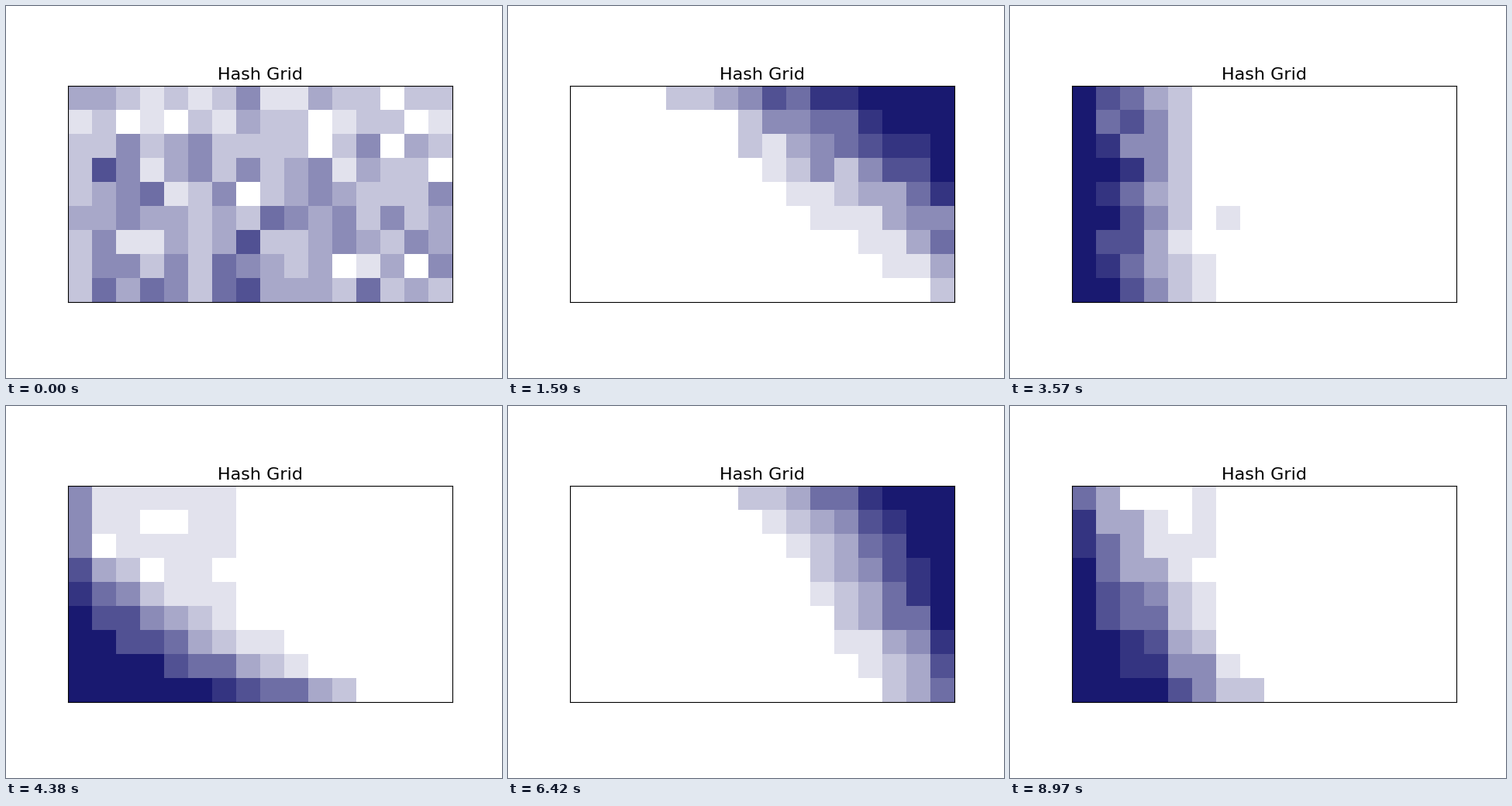
A matplotlib script that plays this animation: 640x480 px, repeating every 9 s.

```python
import numpy as np
import matplotlib.pyplot as plt
from matplotlib.animation import FuncAnimation
from matplotlib.colors import LinearSegmentedColormap

COLS, ROWS = 16, 9
FRAMES, INTERVAL = 300, 30
FULL = 8      # particles in a cell that give the darkest shade
HOLD = 6      # frames between two noise layers
TURN = 2.1    # mean rotation of the swarm, degrees per frame

x, y = np.meshgrid(np.arange(COLS), np.arange(ROWS))
rng = np.random.default_rng(7)
layers = rng.normal(size=(FRAMES // HOLD + 2, ROWS, COLS))


def fill(ramp, total):
    """Raise the ramp until its positive part holds the given total."""
    lo, hi = -30.0, 30.0
    for _ in range(30):
        mid = (lo + hi) / 2
        if np.clip(ramp + mid, 0, None).sum() < total:
            lo = mid
        else:
            hi = mid
    return ramp + lo


def heading(frame):
    """Steady turn that slows down along the long walls."""
    wobble = 27 * np.cos(np.radians(2 * TURN * (frame - 89)))
    return np.radians(TURN * frame - 84 - wobble)


def density(frame):
    a = heading(frame)
    c, s = np.cos(a), np.sin(a)
    settle = min(1, frame / 50) ** 1.5

    # a sloped heap leaning towards the heading
    slope = 0.2 + settle * (1.5 - 0.3 * s)
    ramp = slope * (c * (x - 7.5) - s * (y - 4))
    field = fill(ramp, 396 - 156 * settle)

    # pile-up against the walls
    press = 1.5 * settle
    field[:, 0] += press * max(0, -c)
    field[:, -1] += press * max(0, c)
    field[0] += press * max(0, s)
    field[-1] += press * max(0, -s)

    # stragglers falling along the left side
    if settle == 1 and c < 0 and s < 0:
        lag = -s * min(1, -4 * c)
        trail = lag * np.where(x == 0, 5, 1.2)
        field = np.where(x < 7, np.maximum(field, trail), field)
    return field


def counts(frame):
    k, part = divmod(frame, HOLD)
    w = part / HOLD
    noise = (1 - w) * layers[k] + w * layers[k + 1]
    spread = 0.65 + 0.75 * np.exp(-frame / 15)
    return np.clip(np.rint(density(frame) + spread * noise), 0, FULL)


fig, ax = plt.subplots(figsize=(6.4, 4.8), dpi=100)
shades = LinearSegmentedColormap.from_list("shades", ["white", "midnightblue"])
image = ax.imshow(counts(0), cmap=shades, vmin=0, vmax=FULL,
                  interpolation="nearest")
ax.set_title("Hash Grid", fontsize=16, fontname="DejaVu Sans")
ax.set_xticks([])
ax.set_yticks([])


def update(frame):
    image.set_data(counts(frame))
    return [image]


anim = FuncAnimation(fig, update, frames=FRAMES, interval=INTERVAL, repeat=True)
plt.show()
```
